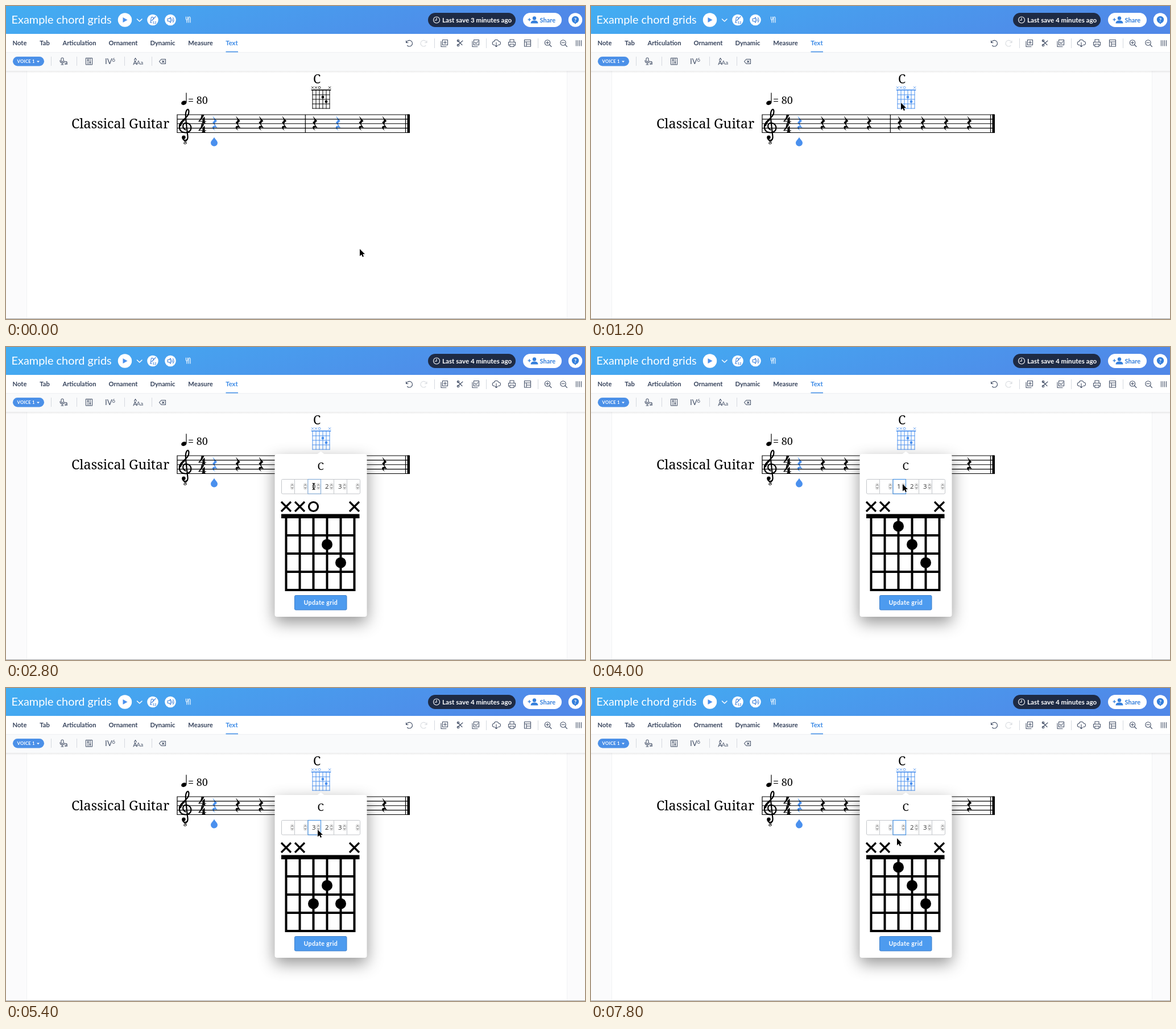
Animation, 1018 px wide and 550 px high, one loop 8000 ms. Source, as an HTML page:

```html
<!DOCTYPE html>
<html lang="en">
<head>
<meta charset="utf-8">
<title>Chord grid editor</title>
<style>
html, body { margin: 0; width: 100%; height: 100%; overflow: hidden; background: #fff; }
svg { display: block; }
text { font-family: Lato, sans-serif; }
.serif text, text.serif { font-family: "Noto Serif", serif; }
.mid { text-anchor: middle; }
.line { fill: none; stroke: #47536a; stroke-width: 1.1; stroke-linecap: round; stroke-linejoin: round; }
.blue { fill: #4a90ee; }
#panel { filter: drop-shadow(0 10px 14px rgba(0, 0, 0, .42)); }
</style>
</head>
<body>
<svg width="1018" height="550" viewBox="0 0 1018 550">
  <defs>
    <linearGradient id="sky" x1="0" y1="0" x2="1" y2=".15">
      <stop offset="0" stop-color="#42aef2"/><stop offset="1" stop-color="#5088e8"/>
    </linearGradient>
    <linearGradient id="fade" x1="0" y1="0" x2="0" y2="1">
      <stop offset="0" stop-color="#000" stop-opacity=".08"/><stop offset="1" stop-color="#000" stop-opacity="0"/>
    </linearGradient>
    <path id="rest" d="M-3 0L4 8Q0 11 0 13Q1 16 4.5 20Q-2 18 -1.5 21Q-1 23.5 1 25Q-4.5 22 -4 18.5Q-3.5 16 .5 16.5L-4 10.5Q0 8 -1 5.5Q-1.5 3 -3.5 .5Z"/>
    <path id="four" d="M5 0H10Q8 6 2 11H7V7L11 3V11H13.5V12H11Q11 14.5 13 15H5Q7 14.5 7 12H0V11Q5 6 5 0Z"/>
  </defs>

  <!-- Page -->
  <rect y="114" width="1018" height="436" fill="#fbfbfc"/>
  <rect x="36" y="114" width="951" height="436" fill="#f1f2f4"/>
  <rect x="37" y="114" width="949" height="436" fill="#fff"/>

  <!-- Score -->
  <g class="serif">
    <text x="115" y="214.5" font-size="23.3">Classical Guitar</text>
    <text x="320" y="172" font-size="18">= 80</text>
    <text class="mid" x="546.5" y="135.5" font-size="21.5">C</text>
    <text class="mid" x="315" y="242.5" font-size="10" font-weight="700" font-style="italic">8</text>
  </g>
  <ellipse cx="312.8" cy="170.2" rx="4.8" ry="3.6" transform="rotate(-22 312.8 170.2)"/>
  <path d="M317 169V152.5" stroke="#000" stroke-width="1.2"/>
  <g id="rests"></g>
  <path id="staff" stroke="#000" stroke-width="1.2" fill="none"/>
  <path d="M705.5 190.4h4.5v32.7h-4.5z"/>
  <path d="M315.5 217.5C309 214 310 205.5 317 205.5C328 206 329 222.5 315.5 222.5C303 222 302 209 310 202C318 195 322 191 321.5 185C321 180 318 181 316.5 186C315 191 316 198 319.5 229C320.5 238 311 238 310.5 231.5" fill="none" stroke="#000" stroke-width="2.2" stroke-linecap="round"/>
  <path d="M306 211Q308 204 314 199" fill="none" stroke="#000" stroke-width="3.4"/>
  <circle cx="312.5" cy="230.8" r="3.2"/>
  <use href="#four" x="338.5" y="191.3"/><use href="#four" x="338.5" y="207.2"/>
  <path class="blue" d="M366 230.5C368 234.5 372 237 372 240.5A6 6 0 0 1 360 240.5C360 237 364 234.5 366 230.5Z"/>
  <g id="small"></g>

  <!-- Header -->
  <rect width="1018" height="49" fill="url(#sky)"/>
  <text x="9.5" y="31" font-size="19.9" fill="#fff">Example chord grids</text>
  <g fill="#fff">
    <circle cx="209" cy="24.5" r="12.2"/><circle cx="258" cy="24.5" r="9.8"/>
    <circle cx="289" cy="24.5" r="9.8"/><circle cx="1001" cy="24.5" r="12.2"/>
    <rect x="909" y="12" width="68" height="25" rx="12.5"/>
  </g>
  <path class="blue" d="M205.5 20V29L213.5 24.5Z"/>
  <g class="line" style="stroke:#fff">
    <path d="M230.5 23L234.8 27L239 23" stroke-width="1.5"/>
    <path d="M316.5 19v3.5q0 2 1.5 2t1.500-2V19M318 24.500V29M321 29V21q0-2 1.500-2t1.500 2v4M324 25v4"/>
  </g>
  <g class="line" style="stroke:#3f83dd">
    <path d="M254 29L255.500 19.500H258.500L259.500 23M253.500 29h3M256 26L263 18.500"/>
    <path d="M284 22.500h2.500l3-2.500v9l-3-2.500h-2.500zM291.500 22.500q1.500 2 0 4M293.500 20.500q3 4 0 8"/>
  </g>
  <text x="257.500" y="30.500" font-size="6" font-weight="700" fill="#3f83dd">12</text>
  <rect x="742" y="12" width="154" height="25" rx="12.500" fill="#1e2b45"/>
  <g class="line" style="stroke:#fff"><circle cx="757" cy="24.500" r="5.500"/><path d="M757 21v4h-3"/></g>
  <text id="saved" x="767" y="28.500" font-size="11.600" font-weight="700" fill="#fff"></text>
  <text x="938.500" y="28.500" font-size="11" font-weight="700" fill="#347fdc">Share</text>
  <g fill="#347fdc">
    <circle cx="929" cy="21.500" r="3.200"/>
    <path d="M922.500 30.500q0-5 6.500-5t6.500 5zM917.500 23.200h2v-2h1.400v2h2v1.400h-2v2h-1.400v-2h-2z"/>
    <circle cx="1001" cy="24" r="6.200"/><path d="M998 28l3 4 3-4z"/>
  </g>
  <text class="mid" x="1001" y="27.500" font-size="9.500" font-weight="700" fill="#fff">?</text>

  <!-- Toolbars -->
  <rect y="49" width="1018" height="33" fill="#fff"/>
  <rect y="81" width="1018" height="33" fill="#f9fafb"/>
  <path d="M0 81.500H1018" stroke="#eef0f3"/>
  <rect y="114" width="1018" height="4" fill="url(#fade)"/>
  <g id="tabs" class="mid" font-size="11.200" font-weight="700"></g>
  <path d="M386.500 80.500H408" stroke="#3b8ae6" stroke-width="1.500"/>
  <path d="M753.500 57v17M844.500 57v17M935.500 57v17M79.500 89v16M124.500 89v16M208.500 89v16M256.500 89v16" stroke="#d5d9df"/>
  <g class="line">
    <path d="M703.500 61v3.500h3.500M704 64.500A5.300 5.300 0 1 1 705.500 69.500"/>
    <path d="M740 61v3.500h-3.500M739.500 64.500A5.300 5.300 0 1 0 738 69.500" opacity=".2"/>
    <path d="M767.500 59.500h9v9h-9zM765 62v9.500h9M772 61.500v5M769.500 64h5"/>
    <path d="M794 60.500L802 68.500M794 69L803 61"/>
    <circle cx="795" cy="61" r="1.800"/><circle cx="795" cy="69" r="1.800"/>
    <path d="M822.500 59.500h9v9h-9zM820 62v9.500h9M824.500 64l2 2 3.500-4"/>
    <path d="M859 68.500h-.500a3 3 0 0 1-.500-6a4.200 4.200 0 0 1 8-.500a3.200 3.200 0 0 1 .500 6.500h-1M862 64v7.500M860 69.500l2 2 2-2"/>
    <path d="M886 63.500v-4.500h7v4.500M886 69h-2.500v-5.500h12v5.500h-2.500M886 67h7v4.500h-7z"/>
    <path d="M911.500 59.500h11v11.500h-11zM911.500 63h11M915 63v8M915 67h7.500"/>
    <circle cx="952" cy="64.500" r="4.700"/><path d="M955.500 68l3.500 3.500M949.500 64.500h5M952 62v5"/>
    <circle cx="979.500" cy="64.500" r="4.700"/><path d="M983 68l3.500 3.500M977 64.500h5"/>
    <path d="M1002.500 60.500v9.500M1005.500 60.500v9.500M1008.500 60.500v9.500M1011.500 60.500v9.500"/>
    <rect x="97" y="91" width="4" height="7" rx="2"/><path d="M95 95.500q0 4.500 4 4.500t4-3.500M99 100v3M97 103h4"/>
    <path d="M140.500 91.500h11v11.500h-11zM144.200 91.500v11.500M147.800 91.500v11.500"/>
    <path d="M225.500 95l2-3.500 2 3.500M224 103l3-7 3 7M225 101h4"/>
    <path d="M269.500 97.500l3.500-4h7.500v8H273zM274.500 95.800l3.500 3.500M278 95.800l-3.500 3.500"/>
  </g>
  <g fill="#47536a">
    <circle cx="144.200" cy="95" r="1.300"/><circle cx="147.800" cy="99" r="1.300"/>
    <text x="103" y="103" font-size="10.500" font-weight="700">a</text>
    <text x="174" y="102" font-size="13.500">IV</text><text x="186.500" y="97.500" font-size="9.500">6</text>
    <text x="229.500" y="103" font-size="10">Aa</text>
  </g>
  <rect x="12" y="89" width="55" height="16.500" rx="8.200" fill="#4b90e8"/>
  <text x="19.500" y="100" font-size="7.800" font-weight="700" letter-spacing=".2" fill="#fff">VOICE 1</text>
  <path d="M54 96.500h5l-2.500 2.800z" fill="#fff"/>
  <path d="M0 549.500H1018" stroke="#a4a6a9"/>

  <!-- Popup -->
  <g id="popup">
    <g id="panel" fill="#fff">
      <rect x="472.500" y="188" width="162" height="286" rx="4"/><path d="M547 188.500l6.500-5 6.500 5z"/>
    </g>
    <text class="serif mid" x="553.300" y="216" font-size="18.500">C</text>
    <rect x="484.500" y="232.500" width="138" height="25.500" rx="2" fill="#fff" stroke="#c3c6ca"/>
    <g id="cells"></g>
    <rect id="focus" x="531" y="232.500" width="22.500" height="25.500" fill="none" stroke="#4a94e4" stroke-width="1.200"/>
    <g id="big"></g>
    <rect x="507.500" y="436.500" width="91.500" height="25.500" rx="2" fill="#4d9bef" stroke="#3c7fcb"/>
    <text class="mid" x="553.300" y="453" font-size="10.600" font-weight="700" letter-spacing=".4" fill="#fff">Update grid</text>
  </g>

  <path id="arrow" d="M0 0V12.500L3 9.800L5 14L7 13L5.200 9H9Z" stroke="#fff" stroke-width="1" paint-order="stroke"/>
  <path id="ibeam" d="M-2.500-5.500Q0-5.500 0-4V4Q0 5.500-2.500 5.500M2.500-5.500Q0-5.500 0-4M2.500 5.500Q0 5.500 0 4" fill="none" stroke="#000" stroke-width="1.200"/>
</svg>
<script>
const LOOP = 8000, STEP = 200, BLUE = '#4a90ee';
const $ = id => document.getElementById(id);
const range = n => [...Array(n).keys()];
const show = (id, on) => $(id).setAttribute('visibility', on ? 'visible' : 'hidden');

// Timed states: [start, ...values]
const cursorPath = [[0, 622, 427], [200, 622, 427], [1000, 545, 170], [1600, 545, 170], [2400, 541, 245],
  [3000, 541, 245], [3400, 548, 241], [4800, 548, 241], [5200, 548, 249], [7200, 548, 249], [7800, 538, 264]];
const values = [[0, 0], [3600, 1], [4400, 2], [4800, 3], [6000, 2], [6600, 1], [7200, '']];

const lastBefore = (list, t) => list.filter(k => k[0] <= t).pop();

function cursorAt(t) {
  const a = lastBefore(cursorPath, t), b = cursorPath[cursorPath.indexOf(a) + 1] || a;
  const p = a === b ? 0 : (t - a[0]) / (b[0] - a[0]);
  const e = p * p * (3 - 2 * p);
  return [1, 2].map(i => a[i] + (b[i] - a[i]) * e);
}

// Chord diagram; '' is a muted string, 0 an open one, null leaves it unmarked
function chord(x, y, scale, frets, color) {
  const lines = range(6).map(i => `M${i * 24} 0V130`).join('') + range(4).map(i => `M-2 ${i * 32 + 32}H122`).join('');
  const marks = frets.map((f, i) => {
    const cx = i * 24;
    if (f === null) return '';
    if (f === '') return `<path d="M${cx - 8.5} -27l17 17m0 -17l-17 17"/>`;
    return f ? `<circle cx="${cx}" cy="${f * 32 - 16}" r="9.5" fill="${color}" stroke="none"/>`
             : `<circle cx="${cx}" cy="-18.500" r="8"/>`;
  }).join('');
  return `<g transform="translate(${x} ${y}) scale(${scale})" fill="none" stroke="${color}" stroke-width="3.200">
    <path d="${lines}" stroke-width="4"/><path d="M-8.500 -1.700H129" stroke-width="7.500"/>${marks}</g>`;
}

function cell(value, i) {
  const x = 484.5 + i * 23;
  return `<text x="${x + 50 / 1 - 0.2 - 0 - 0 - 0 - 0 - 0 - 0 - 0 - 0 - 42.3}" y="249" style="font-family:'Open Sans',sans-serif" font-size="11.500" fill="#333">${value}</text>
    ${i ? `<path d="M${x} 232.500v25.500" stroke="#c3c6ca"/>` : ''}
    <rect x="${x + 16}" y="239.500" width="5.500" height="11" rx="2.500" fill="#f4f4f4" stroke="#c4c4c4" stroke-width=".7"/>
    <path d="M${x + 17.3} 243.500l1.500-2 1.500 2m0 3l-1.500 2-1.500-2" fill="none" stroke="#444" stroke-width=".9"/>`;
}

const staffY = range(5).map(i => 191 + i * 7.88);
$('staff').setAttribute('d', staffY.map(y => `M301 ${y}H709`).join('') + 'M301 190.400V223.100M526.300 191V222.500M702.500 191V222.500');

const tabs = { Note: 24, Tab: 68, Articulation: 129, Ornament: 206, Dynamic: 275.5, Measure: 342, Text: 397 };
$('tabs').innerHTML = Object.entries(tabs).map(([name, x]) =>
  `<text x="${x}" y="69.300" fill="${name === 'Text' ? '#3b8ae6' : '#35425b'}">${name}</text>`).join('');

function draw(t) {
  const open = t >= 1400, value = lastBefore(values, t)[1];
  const [x, y] = cursorAt(t);
  const typing = open && x < 545 && y > 233 && y < 258;

  $('saved').textContent = `Last save ${t < 600 ? 3 : 4} minutes ago`;
  $('rests').innerHTML = range(8).map(i => {
    const lit = i === 0 || (i === 5 && t < 400);
    return `<use href="#rest" x="${(i < 4 ? 367 : 380.3) + i * 40.7}" y="194" fill="${lit ? BLUE : '#000'}"/>`;
  }).join('');
  $('small').innerHTML = chord(539, 148, .25, ['', '', 0, 2, 3, ''], t < 1000 ? '#000' : BLUE);

  $('popup').style.display = open ? '' : 'none';
  $('cells').innerHTML = ['', '', value, 2, 3, ''].map(cell).join('');
  $('big').innerHTML = chord(492.5, 299, 1, ['', '', value === '' ? 1 : value, 2, 3, ''], '#000');
  $('focus').setAttribute('opacity', t < 2600 ? 0 : t < 3400 ? .5 : 1);

  for (const id of ['arrow', 'ibeam']) {
    $(id).setAttribute('transform', `translate(${x} ${y})`);
    show(id, (id === 'ibeam') === typing);
  }
}

let drawn = -1;
function frame(now) {
  const t = Math.floor(now % LOOP / STEP) * STEP;
  if (t !== drawn) draw(drawn = t);
  requestAnimationFrame(frame);
}
draw(0);
requestAnimationFrame(frame);
</script>
</body>
</html>
```
